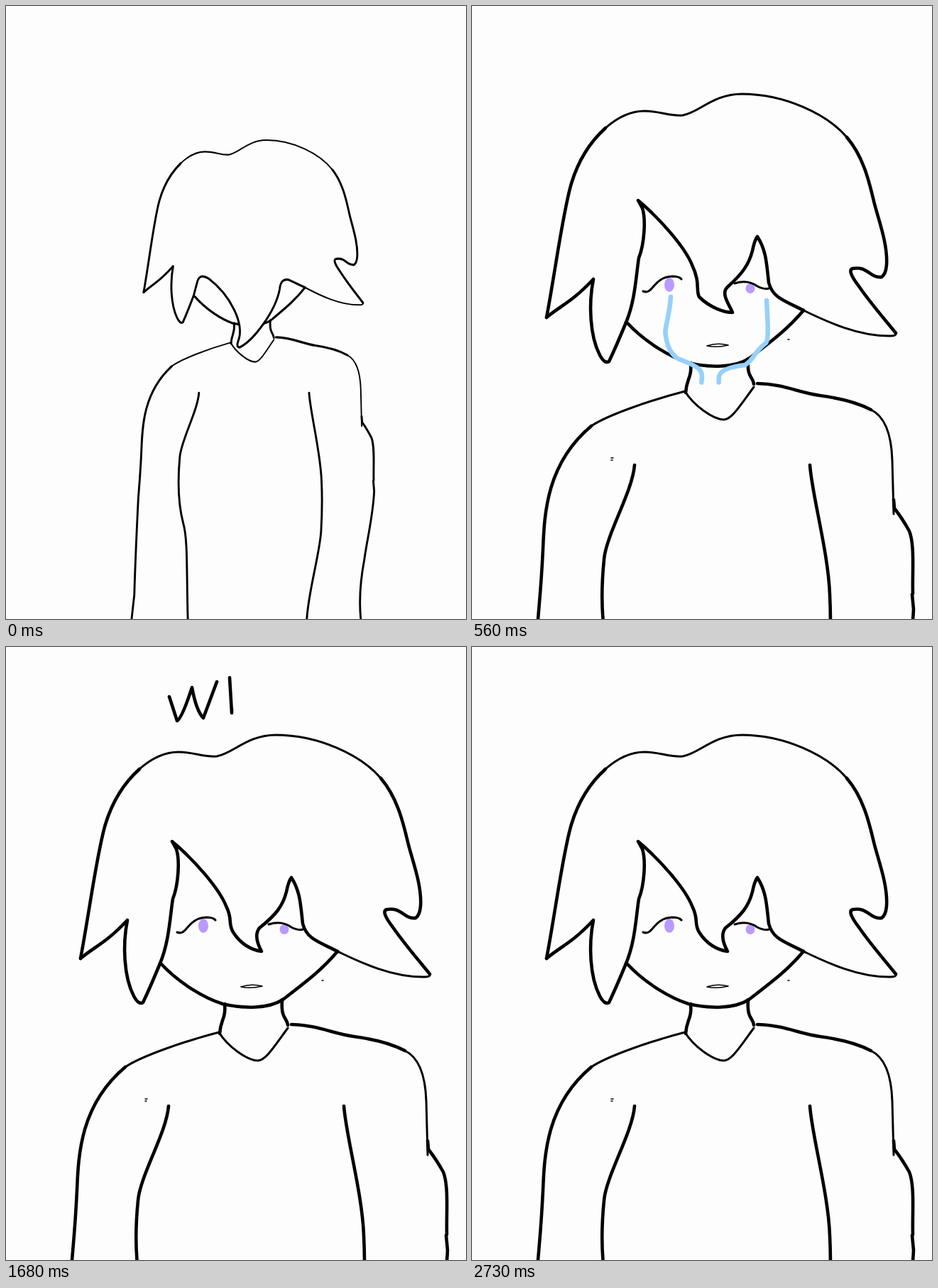
Write an HTML page that moves like this. It is 648x864 px and loops after 2800 ms.

```html
<!DOCTYPE html>
<html lang="en">
<head>
<meta charset="utf-8">
<style>
html, body { margin: 0; height: 100%; overflow: hidden; background: #fdfdfd; }
svg { display: block; }
path { fill: none; stroke: #000; stroke-width: 4.6; stroke-linecap: round; stroke-linejoin: round; }
.thin { stroke-width: 3; }
.fine { stroke-width: 1.6; }
.tear { stroke: #96d0fb; stroke-width: 6.5; }
.wet { fill: #96d0fb; stroke: none; }
ellipse { fill: #b99aff; }
</style>
</head>
<body>
<svg width="648" height="864" viewBox="0 0 648 864">
  <g id="figure">
    <!-- body -->
    <path class="thin" d="M300,543C250,556 190,577 168,592"/>
    <path d="M168,592C105,645 102,715 100,765C98,810 95,840 93,864C90,920 86,1000 84,1065L78,1115"/>
    <path d="M229,647C226,685 189,745 186,780C181,830 183,880 194,918C204,950 201,1010 204,1115"/>
    <path d="M476,647C479,690 502,770 504,830C506,870 505,900 503,933C500,980 474,1060 471,1115"/>
    <path d="M402,532C440,533 460,545 490,549C520,553 545,560 562,569"/>
    <path class="thin" d="M562,569C585,580 591,610 592,640L594,716"/>
    <path d="M594,696L595,708Q606,722 616,740C624,760 620,800 621,828M620,829L622,850C620,900 606,950 600,992Q586,1060 592,1115"/>
    <path d="M308,503C310,525 302,525 301,545M389,497C387,525 396,522 397,533"/>
    <path class="thin" d="M300,543C312,563 340,583 355,583C366,583 380,560 397,537"/>
    <path d="M218,446C245,475 280,495 305,503C335,510 370,510 390,497C425,470 445,455 467,429"/>

    <!-- face -->
    <g id="shut">
      <path class="wet" d="M262,424Q275,405 302,405Q280,414 262,424M385,412Q410,405 424,416Q420,426 408,416Z"/>
      <path class="thin" d="M252,422C265,430 265,404 290,404Q302,403 306,406M382,414C400,406 415,412 434,417"/>
    </g>
    <g id="open">
      <ellipse cx="278" cy="393" rx="7" ry="10"/>
      <ellipse cx="392" cy="398" rx="6.5" ry="7"/>
      <path class="thin" d="M241,402C255,408 255,382 282,381Q292,381 295,385M370,391C385,386 395,390 402,395Q412,400 418,398"/>
    </g>
    <path id="details" class="fine" d="M331,479Q345,474 361,478Q345,482 331,479M445,470h2M196,637h3M196,640h2"/>

    <!-- hair -->
    <path id="fringe"/>
    <path d="M105,439C118,370 128,290 140,250C150,217 167,191 188,172"/>
    <path class="thin" d="M188,172C205,157 224,148 243,148C265,148 280,156 297,154C320,150 340,124 380,124C440,124 500,152 528,185"/>
    <path d="M528,185C552,213 560,250 566,275C572,300 586,335 584,365Q583,378 577,382C560,384 558,366 536,370Q528,373 545,395C560,417 580,440 597,461"/>
    <path class="thin" d="M597,461Q598,465 590,465C545,466 500,445 467,429"/>
    <path d="M105,439C125,422 140,418 171,385C164,420 166,465 180,492Q187,505 193,501Q203,480 217,446"/>
    <path class="tear" pathLength="1" d="M280,410C278,440 270,455 273,465Q276,488 290,497C330,512 325,515 322,540L320,575"/>
    <path class="tear" pathLength="1" d="M415,415C417,450 418,470 414,475C395,490 400,495 385,506Q350,510 348,522C346,545 352,555 361,575"/>
  </g>

  <!-- handwriting -->
  <path class="letter" pathLength="1" d="M230,70L241,104Q248,100 262,57Q268,90 278,100L297,49"/>
  <path class="letter" pathLength="1" d="M315,43L318,93V78C325,60 336,60 337,93"/>
  <path class="letter" pathLength="1" d="M351,58C352,100 370,105 378,55"/>
  <path class="letter" pathLength="1" d="M378,55C376,95 368,128 348,130"/>
</svg>
<script>
const STEP = 70, STEPS = 40;
const $ = id => document.getElementById(id);
const all = selector => [...document.querySelectorAll(selector)];
const clamp = x => Math.min(1, Math.max(0, x));
const show = (el, on) => { el.style.display = on ? '' : 'none'; };

const poses = ['matrix(.628 0 0 .681 128 104.6)', 'matrix(.816 0 0 .815 73 63)'];

const leftLock = 'M217,446C230,415 231,380 235,355';
const rightLock = 'C380,378 390,365 395,345Q398,330 402,325C415,345 415,365 418,390C424,412 440,415 467,429';
const parted = tip => leftLock + 'C243,335 245,300 240,285L234,274C265,300 300,340 310,365' + tip + rightLock;
const fringes = {
  covered: 'M217,446L226,415Q232,400 250,410C300,445 332,505 317,540Q312,552 320,553C350,540 400,480 410,433Q412,410 430,413L467,429',
  shut: leftLock + 'C243,335 245,320 243,296C265,315 290,345 305,363C322,385 332,410 322,437C340,448 400,400 413,346C415,385 420,407 437,416L467,429',
  drooping: parted('C322,390 315,400 320,410C335,425 355,432 367,432C362,420 350,405 360,396'),
  swept: parted('C318,382 315,390 318,403C330,425 350,432 387,421C389,414 372,415 366,394'),
  resting: parted('C320,385 312,388 320,402C330,418 345,427 360,429C354,418 350,405 357,396')
};

function fringeAt(step) {
  if (step < 3) return 'covered';
  if (step < 7) return 'shut';
  if (step < 20) return 'drooping';
  return step === 20 ? 'swept' : 'resting';
}

// Shows the stretch of a path between two fractions of its length.
function reveal(path, from, to) {
  show(path, to > from);
  path.style.strokeDasharray = `${to - from} 2`;
  path.style.strokeDashoffset = -from;
}

function draw(step) {
  const shut = step < 7, covered = step < 3;
  $('figure').setAttribute('transform', poses[step] || '');
  $('fringe').setAttribute('d', fringes[fringeAt(step)]);
  $('fringe').style.fill = covered ? '#fdfdfd' : 'none';
  show($('shut'), shut && !covered);
  show($('open'), !shut);
  show($('details'), !covered);

  // Tears run out quickly, then drain from the top.
  const head = 1 - (1 - clamp((step - 3) / 12)) ** 2.7;
  const drained = clamp((step - 8) / 12);
  all('.tear').forEach((path, i) => reveal(path, drained ** (i ? 1 : 1.7), head));

  all('.letter').forEach((path, i) => {
    const written = clamp((step - 20) * 3 / 8 - i);
    reveal(path, 0, step < 33 + 2 * i ? written : 0);
  });
}

function tick() {
  draw(Math.floor(performance.now() / STEP) % STEPS);
  requestAnimationFrame(tick);
}
tick();
</script>
</body>
</html>
```
